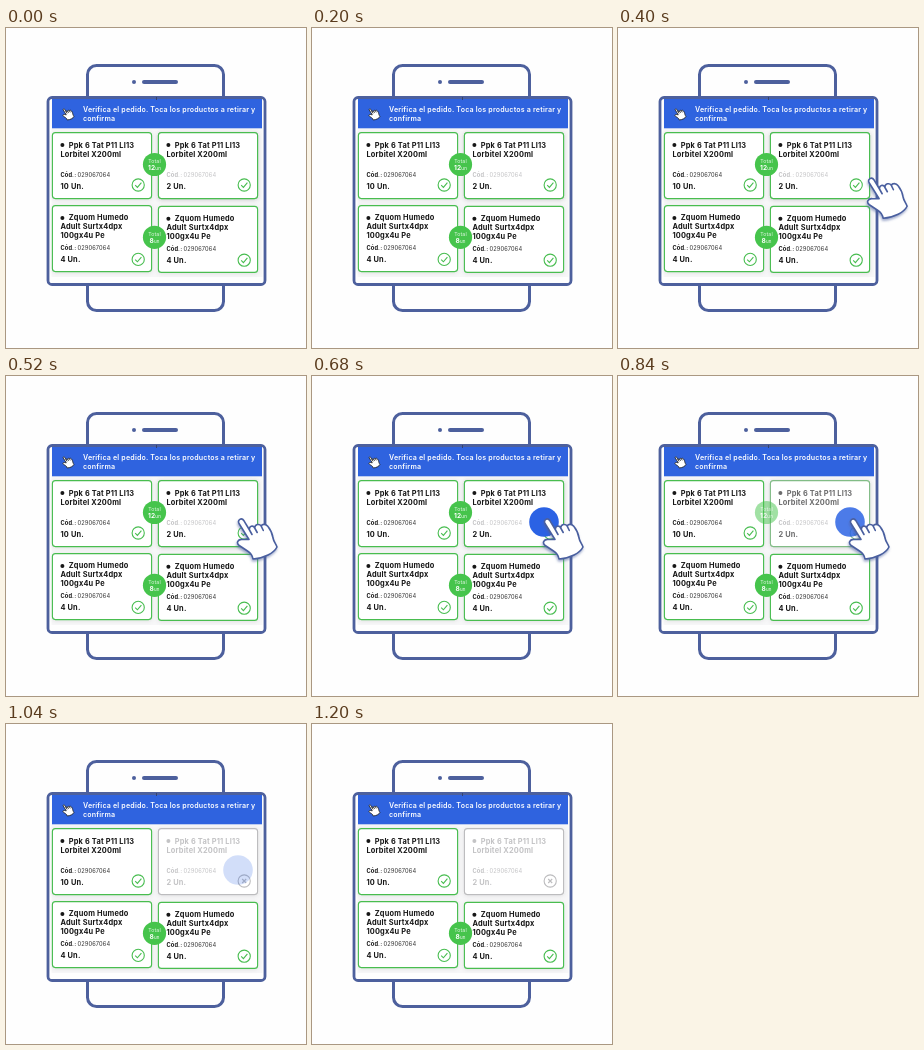
Animation, 300 px wide and 320 px high, one loop 2.76 s. Source, as an HTML page:

```html
<!DOCTYPE html>
<html lang="es">
<head>
<meta charset="utf-8">
<style>
  html, body { margin: 0; width: 100%; height: 100%; overflow: hidden; background: #fefefe; }
  svg { display: block; width: 100%; height: 100%; }
  text { font-family: Inter, "Open Sans", sans-serif; letter-spacing: .025em; }
  .title, .qty { font-size: 7.4px; font-weight: 700; }
  .code { font-size: 5.7px; }
  .header { font-size: 7.1px; font-weight: 600; fill: #fff; }
  .badge { fill: #fff; text-anchor: middle; }
  .frame { fill: #fefefe; stroke: #4d609d; stroke-width: 3; }
  .hand { fill: #fff; stroke-linecap: round; stroke-linejoin: round; }
</style>
</head>
<body>
<svg viewBox="0 0 300 320">
  <defs>
    <filter id="soft" x="-20%" y="-20%" width="140%" height="150%">
      <feDropShadow dx="0" dy=".8" stdDeviation="2" flood-color="#000" flood-opacity=".09"/>
    </filter>
    <filter id="handShadow" x="-20%" y="-20%" width="140%" height="140%">
      <feDropShadow dx="-.5" dy="2" stdDeviation="1.1" flood-color="#4a5f9f" flood-opacity=".5"/>
    </filter>
  </defs>

  <rect class="frame" x="81.5" y="37.5" width="136" height="245" rx="9"/>
  <circle cx="128" cy="54" r="2" fill="#4d609d"/>
  <rect x="136" y="52" width="36" height="4" rx="2" fill="#4d609d"/>
  <rect class="frame" x="42" y="69.5" width="217" height="187" rx="4" style="stroke-width:2.8"/>
  <rect x="45.5" y="71" width="211" height="178" fill="#f7f7f8"/>
  <rect x="46" y="71" width="210" height="29.3" fill="#2f63df"/>
  <rect x="150" y="69" width="1" height="3" fill="#34436f"/>

  <g class="hand" transform="translate(57 80.5) scale(.28) translate(-232 -142)" stroke="#222" stroke-width="3">
    <use href="#handShape"/>
  </g>
  <text class="header" x="77" y="84.3">Verifica el pedido. Toca los productos a retirar y</text>
  <text class="header" x="77" y="93">confirma</text>

  <g id="cards"></g>
  <g id="badges"></g>
  <circle id="tap" cx="232" cy="146" fill="#2b62e4"/>

  <g id="hand" class="hand" stroke="#4a5f9f" stroke-width="1.6" filter="url(#handShadow)">
    <path id="handShape" d="M243 163.5L233 147.5C231.2 143.8 235.5 141 238 144.8L243.5 154
      C242.8 150 247 148.8 248.7 152C248.9 148 253.5 147.4 255.2 150.2C256 147.8 260 147.6 262 150.5
      C265.5 155 266.5 158.5 267 162C267.6 165.5 270 168 271 171C268 177 258 182.5 247 183
      C246.5 179.5 244.5 177 241.5 175L233.2 169.5C229.8 166.8 232 163.2 236 163.4Z
      M243.5 154L246 158.5M248.7 152L251.2 156.5M255.2 150.2L257.3 154.5"/>
  </g>
</svg>

<script>
const LOOP = 2760, STEP = 40;
const GREEN = '#48bd50', DARK = '#171717', PALE = '#c3c3c5';
const $ = id => document.getElementById(id);
const clamp = v => Math.max(0, Math.min(1, v));
const progress = (t, start, end) => clamp((t - start) / (end - start));
const ease = p => (1 - Math.cos(Math.PI * p)) / 2;

const drink = ['Ppk 6 Tat P11 LI13', 'Lorbitel X200ml'];
const food = ['Zquom Humedo', 'Adult Surtx4dpx', '100gx4u Pe'];

function card(x, y, lines, qty, { on = true, paleCode = false, id = '' } = {}) {
  const ink = on ? DARK : PALE, edge = on ? GREEN : '#bcbcbe';
  const codeInk = on && !paleCode ? '#333' : PALE;
  const titleY = lines.length > 2 ? 14.6 : 15;
  const titles = lines.map((line, i) =>
    `<text class="title" x="${i ? 8 : 16.3}" y="${titleY + i * 9}">${line}</text>`).join('');
  const mark = on ? 'M-3 .2L-.8 2.4L3.2 -2.3' : 'M-2 -2L2 2M2 -2L-2 2';
  const iconY = lines.length > 2 ? 53.8 : 52.4;
  return `<g ${id && `id="${id}"`} transform="translate(${x} ${y})" fill="${ink}">
    <rect width="99.2" height="66" rx="3" fill="#fff" stroke="${edge}" stroke-width="1.15" filter="url(#soft)"/>
    <circle cx="10" cy="12.4" r="2"/>${titles}
    <text class="code" x="8" y="44.6" font-weight="700" fill="${paleCode ? PALE : ink}">Cód.:</text>
    <text class="code" x="25" y="44.6" fill="${codeInk}">029067064</text>
    <text class="qty" x="8" y="56.5">${qty} Un.</text>
    <g transform="translate(85.8 ${iconY})" fill="none" stroke="${edge}" stroke-width="1.1">
      <circle r="6.1"/><path d="${mark}"/>
    </g></g>`;
}

function badge(y, count, id) {
  return `<g id="${id}" transform="translate(148.5 ${y})">
    <circle r="11.6" fill="#46c44c"/>
    <text class="badge" y="-1.5" font-size="5.2" opacity=".85">Total</text>
    <text class="badge" y="5.7" font-size="6.6" font-weight="700">${count}<tspan
      font-size="4.5" font-weight="400">un</tspan></text></g>`;
}

$('cards').innerHTML =
  card(46.4, 104.6, drink, 10) +
  card(152.4, 104.6, drink, 2, { on: false }) +
  card(152.4, 104.6, drink, 2, { paleCode: true, id: 'activeCard' }) +
  card(46.4, 177.6, food, 4) +
  card(152.4, 178.4, food, 4);
$('badges').innerHTML = badge(136.5, 12, 'drinkBadge') + badge(209.3, 8, 'foodBadge');

function draw(now) {
  const t = Math.floor(now % LOOP / STEP) * STEP;

  // The hand slides in from the right, taps, and leaves the same way.
  const away = 1 - ease(progress(t, 140, 520)) + ease(progress(t, 840, 1040));
  $('hand').setAttribute('transform', `translate(${80 * away} ${32 * away})`);

  $('tap').setAttribute('r', 14.8 * ease(progress(t, 560, 680)));
  $('tap').setAttribute('opacity', 1 - ease(progress(t, 720, 1180)));

  const active = 1 - ease(progress(t, 720, 960));
  $('activeCard').setAttribute('opacity', active);
  $('drinkBadge').setAttribute('opacity', active);
}

const begin = performance.now();
function tick() {
  draw(performance.now() - begin);
  requestAnimationFrame(tick);
}
tick();
</script>
</body>
</html>
```
